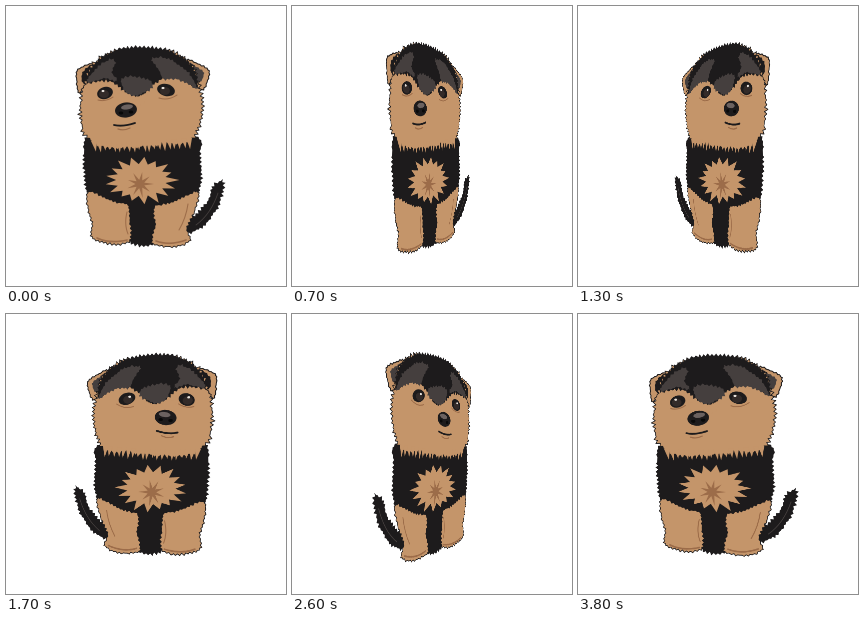
Write an HTML page with a canvas that moves like this. It is 280x280 px and loops after 3.9 s.

```html
<!DOCTYPE html>
<html lang="en">
<head>
<meta charset="utf-8">
<title>Turning puppy</title>
<style>
html, body { margin: 0; width: 100%; height: 100%; overflow: hidden; background: #fff; }
canvas { display: block; width: 280px; height: 280px; }
</style>
</head>
<body>
<canvas id="stage" width="280" height="280"></canvas>
<script>
const SIZE = 280, MID = 140, RES = 2;
const LOOP = 3900, STEP = 100, DEPTH = 390, EASE = 0.19;
const TAN = '#c4956a', BLACK = '#1d1b1c', GREY = '#453f3e', BROWN = '#9c6c49';

const stage = document.getElementById('stage').getContext('2d');
const art = document.createElement('canvas');
art.width = art.height = SIZE * RES;
const g = art.getContext('2d');
g.scale(RES, RES);
g.lineJoin = g.lineCap = 'round';

let seed = 17;
function rand() {
  seed = (seed * 16807) % 2147483647;
  return seed / 2147483647;
}

// Closed smooth curve through flat x,y pairs, sampled about every `gap` pixels.
function smooth(flat, gap) {
  const n = flat.length / 2, out = [];
  const at = (i, k) => flat[((i + n) % n) * 2 + k];
  for (let i = 0; i < n; i++) {
    const len = Math.hypot(at(i + 1, 0) - at(i, 0), at(i + 1, 1) - at(i, 1));
    const parts = Math.max(2, Math.round(len / gap));
    for (let j = 0; j < parts; j++) {
      const u = j / parts;
      out.push([0, 1].map(k => {
        const a = at(i - 1, k), b = at(i, k), c = at(i + 1, k), d = at(i + 2, k);
        return b + 0.5 * u * (c - a + u * (2 * a - 5 * b + 4 * c - d + u * (3 * (b - c) + d - a)));
      }));
    }
  }
  return out;
}

// Fills a clockwise shape whose edge is broken into tufts.
function fur(flat, color, tuft = 2, edge = 0, gap = 2) {
  const pts = smooth(flat, gap), n = pts.length;
  g.beginPath();
  pts.forEach(([x, y], i) => {
    const p = pts[(i + n - 1) % n], q = pts[(i + 1) % n];
    const dx = q[0] - p[0], dy = q[1] - p[1], len = Math.hypot(dx, dy) || 1;
    const out = (i % 2 ? rand() : -rand() * 0.5) * tuft;
    g.lineTo(x + dy / len * out, y - dx / len * out);
  });
  g.closePath();
  g.fillStyle = color;
  g.fill();
  if (edge) {
    g.strokeStyle = BLACK;
    g.lineWidth = edge;
    g.stroke();
  }
}

function burst(cx, cy, rx, ry, spikes, inner, color) {
  g.beginPath();
  for (let i = 0; i < spikes * 2; i++) {
    const a = i * Math.PI / spikes, r = i % 2 ? inner : 0.82 + rand() * 0.2;
    g.lineTo(cx + Math.cos(a) * rx * r, cy + Math.sin(a) * ry * r);
  }
  g.closePath();
  g.fillStyle = color;
  g.fill();
}

function oval(x, y, rx, ry, color, turn = 0) {
  g.beginPath();
  g.ellipse(x, y, rx, ry, turn, 0, Math.PI * 2);
  g.fillStyle = color;
  g.fill();
}

function curve(x1, y1, cx, cy, x2, y2, color, width) {
  g.beginPath();
  g.moveTo(x1, y1);
  g.quadraticCurveTo(cx, cy, x2, y2);
  g.strokeStyle = color;
  g.lineWidth = width;
  g.stroke();
}

function drawBody() {
  fur([179,216, 192,207, 202,194, 208,180, 216,175, 217,184, 212,200, 203,214, 191,224, 180,227], BLACK, 2.5);
  curve(190, 219, 205, 208, 212, 187, GREY, 0.8);
  fur([84,130, 135,134, 190,130, 194,150, 195,172, 191,190, 176,208, 152,236, 124,236,
       104,208, 83,190, 79,172, 78,148], BLACK, 2.5);
  fur([82,186, 95,190, 109,196, 122,199, 124,216, 124,234, 112,238, 96,236, 86,231, 86,216, 82,202], TAN, 1.6, 0.8);
  fur([148,201, 160,198, 176,192, 192,186, 189,204, 181,222, 184,234, 172,240, 156,240, 146,236, 149,220], TAN, 1.6, 0.8);
  curve(91, 232, 104, 238, 121, 234, BROWN, 1.6);
  curve(150, 235, 164, 240, 180, 234, BROWN, 1.6);
  curve(121, 206, 118, 218, 122, 228, BROWN, 1);
  curve(182, 198, 180, 212, 173, 224, BROWN, 1);
  burst(135, 174, 39, 25, 17, 0.64, TAN);
  burst(134, 178, 15, 14, 9, 0.3, BROWN);
}

function drawEars() {
  fur([71,65, 79,60, 87,58, 85,72, 79,80, 73,87, 71,76], TAN, 1, 1);
  fur([76,68, 86,59, 87,72, 78,78], BLACK, 1);
  fur([181,54, 192,58, 203,65, 201,76, 196,84, 189,77, 182,68], TAN, 1, 1);
  fur([183,57, 192,62, 198,67, 194,76, 187,72], GREY, 1);
}

function drawHead() {
  fur([84,62, 100,49, 120,43, 150,43, 172,49, 186,61, 192,78, 196,96, 195,114, 190,127,
       182,137, 162,137, 145,140, 125,142, 106,142, 90,138, 79,128, 75,112, 75,94, 79,76], TAN, 3, 0.8);
  // Coat over the brow, with ragged lower edges.
  fur([80,76, 86,61, 100,49, 120,42, 150,42, 172,49, 186,61, 192,82, 182,76, 169,72, 157,73,
       146,79, 138,88, 127,91, 116,83, 104,75, 92,75], BLACK, 2.2);
  fur([81,75, 91,62, 105,53, 109,57, 106,66, 111,75, 100,72, 90,75], GREY, 1.6);
  fur([146,53, 159,52, 173,59, 184,69, 191,83, 181,77, 171,73, 158,73, 153,64], GREY, 1.8);
  fur([115,74, 127,71, 143,74, 147,80, 139,86, 133,89, 122,88], GREY, 2);
  fur([111,89, 120,87, 130,91, 142,88, 136,98, 126,101, 115,99], TAN, 1.5);
  oval(99, 87, 8, 6, BLACK, -0.3);
  oval(98, 88, 5, 4, '#332b29');
  oval(97, 85, 1.4, 1.1, '#e8e2dc');
  oval(160, 84, 9, 6, BLACK, 0.25);
  oval(159, 85, 5, 4, '#332b29');
  oval(157, 82, 1.5, 1.1, '#e8e2dc');
  curve(92, 94, 100, 96, 107, 91, BROWN, 1);
  curve(153, 92, 162, 95, 171, 89, BROWN, 1);
  oval(120, 104, 11, 7.5, BLACK, -0.12);
  oval(121, 101, 6, 2.5, '#6b6260', -0.15);
  oval(115, 107, 2.2, 1.5, '#090909');
  oval(125, 106, 2.2, 1.5, '#090909');
  curve(108, 119, 117, 121, 129, 117, BLACK, 1.8);
  curve(112, 123, 118, 125, 124, 122, BROWN, 1.2);
  // Chin tufts hanging over the chest.
  for (let x = 88; x < 184; x += 5) {
    const y = 140 - Math.max(0, x - 145) * 0.08;
    g.beginPath();
    g.moveTo(x - 3, y - 5);
    g.lineTo(x + rand() * 2, y + 3 + rand() * 4);
    g.lineTo(x + 3, y - 5);
    g.fillStyle = TAN;
    g.fill();
  }
}

drawBody();
drawEars();
drawHead();

// Turns the flat picture about its vertical axis in perspective.
function project(angle) {
  const c = Math.cos(angle), s = Math.sin(angle);
  const unproject = x => x * DEPTH / (c * DEPTH - x * s);
  const scale = x => DEPTH / (DEPTH + x * s);
  const edges = [-80, 80].map(x => x * c * scale(x)).sort((a, b) => a - b);
  for (let x = Math.floor(edges[0]); x < edges[1]; x++) {
    const a = unproject(x), b = unproject(x + 1);
    const left = Math.max(-MID, Math.min(a, b)), right = Math.min(MID, Math.max(a, b));
    if (right <= left) continue;
    const f = scale((left + right) / 2);
    stage.drawImage(art, (left + MID) * RES, 0, (right - left) * RES, SIZE * RES,
      x + MID, MID - MID * f, 1, SIZE * f);
  }
}

function frame(now) {
  const t = Math.floor((now % LOOP) / STEP) * STEP;
  const turn = t / LOOP * Math.PI * 2;
  stage.fillStyle = '#fff';
  stage.fillRect(0, 0, SIZE, SIZE);
  project(turn - EASE * Math.sin(2 * turn));
  requestAnimationFrame(frame);
}
frame(0);
</script>
</body>
</html>
```
